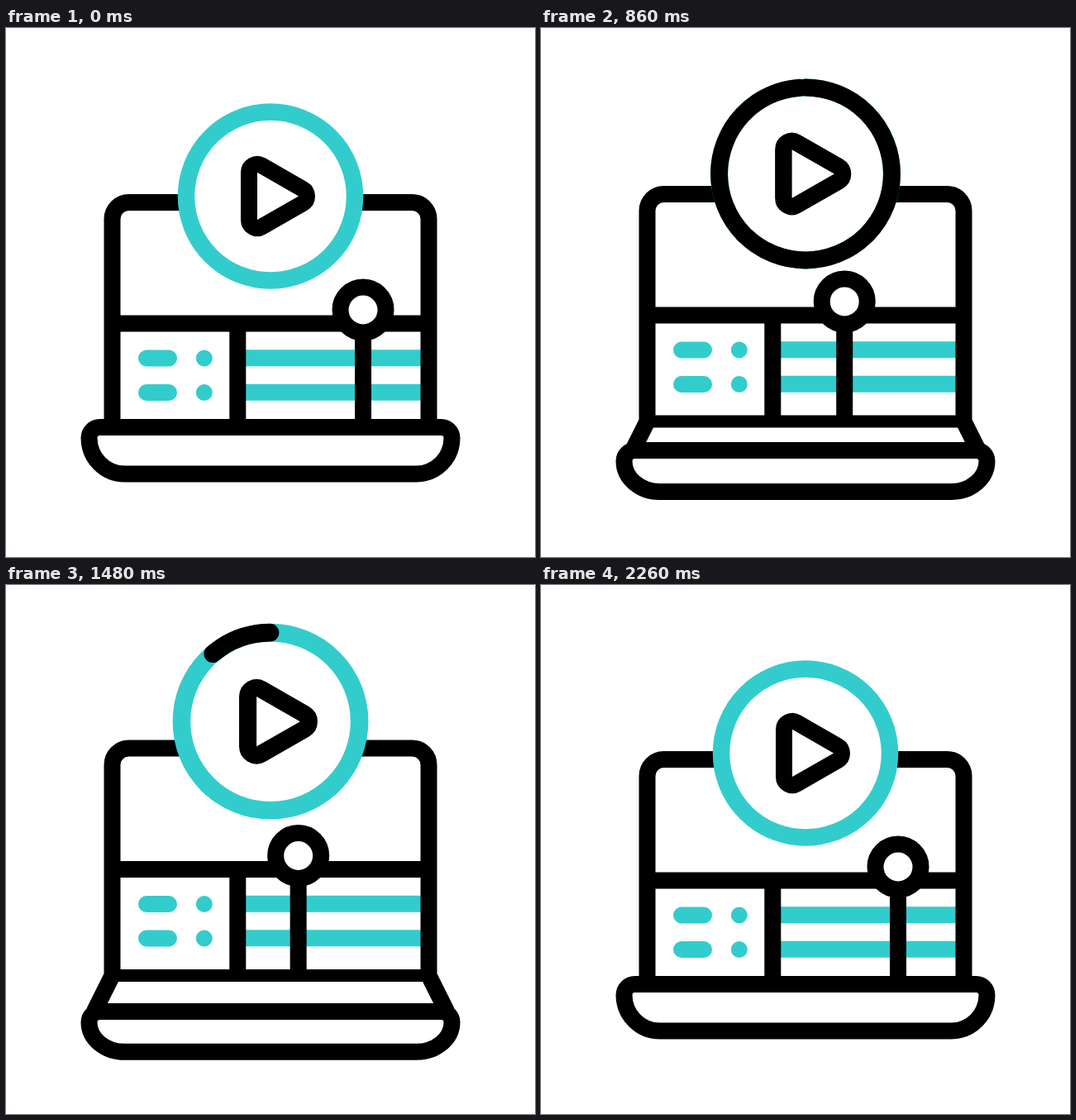
These frames come from a looping animation (640x640 px, 3.02 s). An HTML page:

```html
<!DOCTYPE html>
<html lang="en">
<head>
<meta charset="utf-8">
<title>Video editing</title>
<style>
  html, body { margin: 0; width: 100%; height: 100%; overflow: hidden; background: #fff; }
  svg { display: block; width: 100%; height: 100%; }
  .ink { fill: none; stroke: #000; stroke-width: 20; stroke-linejoin: round; }
  .teal { fill: none; stroke: #3cc; stroke-width: 20; }
  .white { fill: #fff; }
  .cap { stroke-linecap: round; }
  .ring { stroke-width: 20.5; }
</style>
</head>
<body>
<svg viewBox="0 0 640 640">
  <clipPath id="track"><rect x="290" y="225" width="212" height="260"/></clipPath>

  <g id="screen">
    <path class="teal" d="M285 399.3H506M285 440.8H506"/>
    <path class="teal cap" d="M170 399.5H197M170 441H197M239.8 399.5h.01M239.8 441h.01"/>
    <path class="ink" d="M128.5 357.5H511.5M280.3 357.5V486"/>
    <path class="ink" style="stroke-width:15" d="M128.5 486H511.5"/>
    <path class="ink" id="frame"/>
    <g clip-path="url(#track)">
      <g id="head">
        <path class="ink" d="M0 360V486"/>
        <circle class="ink white" cy="341" r="27.5"/>
      </g>
    </g>
  </g>

  <path class="ink white" id="base"/>

  <g id="badge">
    <circle class="teal white ring" r="102"/>
    <circle class="ink cap ring" id="arc" r="102" pathLength="360" transform="rotate(-90)"/>
    <path class="ink" d="M-26-28.7A10 10 0 0 1-11-37.3L39-8.65A10 10 0 0 1 39 8.65L-11 37.3A10 10 0 0 1-26 28.7Z"/>
  </g>
</svg>
<script>
const LOOP = 3020;
const el = id => document.getElementById(id);
const [screenEl, frame, head, base, badge, arc] =
  ['screen', 'frame', 'head', 'base', 'badge', 'arc'].map(el);

const clamp = u => Math.min(1, Math.max(0, u));
const part = (t, from, to) => clamp((t - from) / (to - from));
const smooth = u => u * u * (3 - 2 * u);

// Smooth curve through [time, value] keys, flat at every turning point
function curve(keys) {
  const slope = i => (keys[i + 1][1] - keys[i][1]) / (keys[i + 1][0] - keys[i][0]);
  const tangent = keys.map((k, i) => {
    if (!i || i === keys.length - 1) return 0;
    const a = slope(i - 1), b = slope(i);
    return a * b > 0 ? 2 * a * b / (a + b) : 0;
  });
  return t => {
    if (t <= keys[0][0]) return keys[0][1];
    const i = keys.findIndex(k => k[0] > t) - 1;
    if (i < 0) return keys[keys.length - 1][1];
    const [t0, v0] = keys[i], [t1, v1] = keys[i + 1];
    const d = t1 - t0, u = (t - t0) / d, w = 1 - u;
    return v0 + (v1 - v0) * smooth(u) + d * u * w * (w * tangent[i] - u * tangent[i + 1]);
  };
}

const baseDrop = curve([[200, 0], [320, -1], [600, 14.5], [740, 19], [860, 21.5], [1280, 26],
  [1420, 26.2], [1660, 17], [1840, 0], [1930, -2], [1980, -1.5], [2260, 0]]);
const screenShift = curve([[200, 0], [380, 3], [600, -4], [740, -8], [860, -10], [1280, -14],
  [1420, -14.3], [1660, -6.5], [1840, 2.5], [1960, 4.2], [1980, 4], [2260, 0]]);
const badgeShift = curve([[200, 0], [380, 10], [600, -10.8], [740, -21.5], [860, -27], [1280, -37.2],
  [1430, -39], [1660, -28.5], [1840, 4], [1950, 13.5], [1980, 12.8], [2260, 0]]);
const badgeScale = curve([[200, 1], [420, .955], [600, .984], [740, 1.008], [860, 1.024], [1280, 1.046],
  [1500, 1.055], [1660, 1.051], [1840, .985], [1960, .951], [1980, .953], [2260, 1]]);

// The playhead leaves on the right, sweeps across once, then comes back to rest
function headX(t) {
  if (t < 600) return 432 + 115 * part(t, 200, 560) ** 2;
  if (t < 1270) return 250 + 297 * part(t, 640, 1200);
  return 250 + 182 * (1 - (1 - part(t, 1340, 1750)) ** 2);
}

function draw(t) {
  const drop = baseDrop(t), shift = screenShift(t);
  const top = 483 + 1.3 * drop, bottom = 539.5 + drop;

  // The hinge legs reach from the screen down to the base
  const leg = Math.max(0, top - 486 - shift), foot = 486 + leg;
  screenEl.setAttribute('transform', `translate(0 ${shift})`);
  frame.setAttribute('d', `M${128.5 - leg / 2} ${foot}L128.5 486V231a20 20 0 0 1 20-20H491.5` +
    `a20 20 0 0 1 20 20V486L${511.5 + leg / 2} ${foot}`);
  head.setAttribute('transform', `translate(${headX(t)} 0)`);

  const side = top + 13, ry = bottom - side;
  base.setAttribute('d', `M113.5 ${top}H526.5A13 13 0 0 1 539.5 ${side}A43 ${ry} 0 0 1 496.5 ${bottom}` +
    `H143.5A43 ${ry} 0 0 1 100.5 ${side}A13 13 0 0 1 113.5 ${top}Z`);

  badge.setAttribute('transform', `translate(320 ${203.5 + badgeShift(t)}) scale(${badgeScale(t)})`);
  const from = 360 * smooth(part(t, 990, 1610)), to = 360 * smooth(part(t, 250, 900));
  arc.style.display = to > from ? '' : 'none';
  arc.setAttribute('stroke-dasharray', `${to - from} 800`);
  arc.setAttribute('stroke-dashoffset', -from);
}

const start = performance.now();
function tick() {
  draw((performance.now() - start) % LOOP);
  requestAnimationFrame(tick);
}
tick();
</script>
</body>
</html>
```
